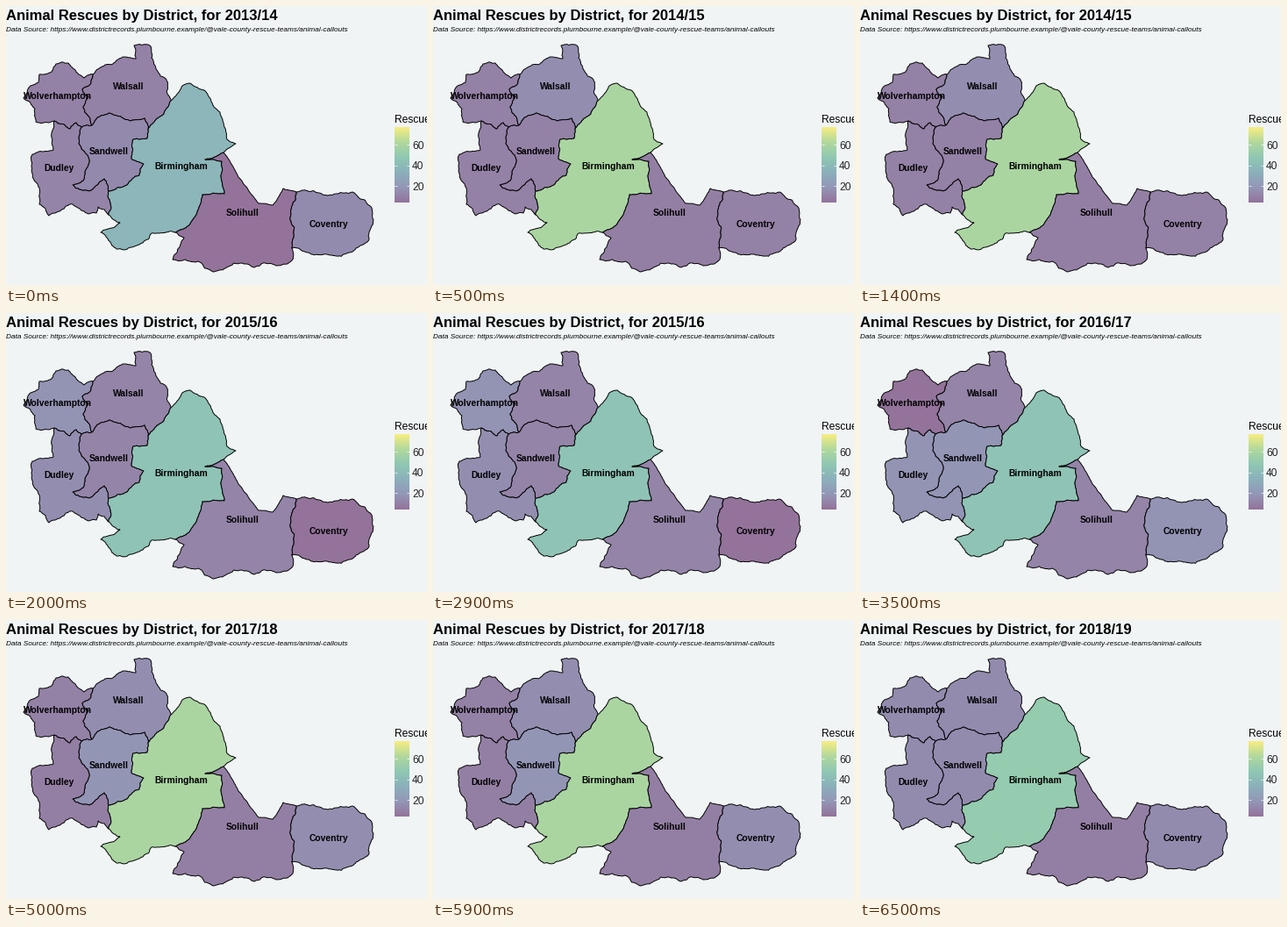
A matplotlib script that plays this animation: 480x318 px, repeating every 8 s.

```python
import math
import random

import matplotlib.pyplot as plt
import numpy as np
from matplotlib.animation import FuncAnimation
from matplotlib.colors import LinearSegmentedColormap, Normalize
from matplotlib.patches import Polygon

W, H, DPI = 480, 318, 100
BG = "#f0f4f5"
CMAP = LinearSegmentedColormap.from_list(
    "rescues", ["#94739b", "#9397b7", "#8bb0bb", "#8fc8b3", "#b0d89d", "#f7ed82"])
NORM = Normalize(4, 77.5)

rng = random.Random(7)


def crinkle(a, b, rough):
    """Points from a up to b, made jagged by midpoint displacement."""
    dx, dy = b[0] - a[0], b[1] - a[1]
    if math.hypot(dx, dy) < 2.5:
        return [a]
    k = rng.uniform(-rough, rough)
    mid = ((a[0] + b[0]) / 2 - dy * k, (a[1] + b[1]) / 2 + dx * k)
    return crinkle(a, mid, rough) + crinkle(mid, b, rough)


def edge(*pts, rough=0.13):
    line = []
    for a, b in zip(pts, pts[1:]):
        line += crinkle(a, b, rough)
    return line + [pts[-1]]


def ring(first, *edges):
    """Chain edges into one outline, flipping those that run backwards."""
    pts = list(first)
    for e in edges:
        pts += e if e[0] == pts[-1] else e[::-1]
    return pts


# Outer edges
wolv_out = edge((55, 131), (34, 132), (33, 117), (20, 105), (28, 91), (37, 87), (38, 78),
                (52, 75), (57, 66), (71, 65), (89, 82), (99, 78))
wals_out = edge((99, 78), (113, 67), (134, 58), (148, 60), (146, 45), (164, 45),
                (166, 59), (183, 84), (188, 108))
bham_n = edge((188, 108), (201, 91), (210, 88), (226, 96), (238, 116), (244, 121),
              (249, 138), (252, 152), (262, 157), (248, 167), rough=0.08)
sol_n = edge((248, 167), (265, 195), (288, 225), (304, 227), (316, 208), (331, 212),
             rough=0.06)
cov_out = edge((331, 212), (357, 213), (377, 214), (395, 212), (418, 236), (414, 266),
               (395, 280), (369, 284), (345, 281), (326, 276))
sol_s = edge((326, 276), (326, 290), (308, 296), (293, 293), (283, 298), (260, 293),
             (250, 299), (237, 303), (219, 291), (190, 289), (203, 264), (193, 258))
bham_s = edge((193, 258), (166, 259), (156, 270), (126, 277), (108, 258), (130, 247),
              (117, 238))
dud_out = edge((117, 238), (105, 229), (103, 236), (94, 237), (76, 226), (49, 239),
               (38, 226), (36, 203), (29, 182), (30, 169), (54, 164), (52, 150), (55, 131))

# Shared borders
wolv_wals = edge((99, 78), (97, 87), (87, 95), (94, 103), (88, 115), (98, 136))
wolv_sand = edge((98, 136), (86, 138))
wolv_dud = edge((86, 138), (80, 133), (73, 140), (55, 131))
wals_bham = edge((188, 108), (180, 123), (162, 141))
wals_sand = edge((162, 141), (158, 128), (142, 131), (118, 122), (98, 136))
dud_sand = edge((86, 138), (86, 163), (95, 176), (88, 199), (76, 204), (95, 211),
                (112, 197), (117, 211))
sand_bham = edge((117, 211), (138, 204), (152, 193), (157, 180), (143, 174), (145, 152),
                 (161, 151), (162, 141))
dud_bham = edge((117, 211), (117, 238))
bham_sol = edge((248, 167), (227, 175), (246, 177), (249, 214), (224, 215), (218, 235),
                (205, 253), (193, 258), rough=0.08)
sol_cov = edge((331, 212), (326, 228), (324, 241), (328, 264), (326, 276))

# name: (outline, label x, label baseline, rescues per year)
DISTRICTS = {
    "Wolverhampton": (ring(wolv_out, wolv_wals, wolv_sand, wolv_dud),
                      59, 106, (10, 10, 17, 4, 10, 14)),
    "Walsall": (ring(wals_out, wals_bham, wals_sand, wolv_wals),
                140, 95, (10, 15, 11, 11, 15, 14)),
    "Sandwell": (ring(wals_sand, wolv_sand, dud_sand, sand_bham),
                 117, 169, (13, 10, 11, 18, 18, 14)),
    "Dudley": (ring(dud_out, wolv_dud, dud_sand, dud_bham),
               60.5, 188, (11, 10, 15, 17, 9, 14)),
    "Birmingham": (ring(bham_n, bham_sol, bham_s, dud_bham, sand_bham, wals_bham),
                   199.5, 186, (37, 60, 45, 45, 60, 51)),
    "Solihull": (ring(sol_n, sol_cov, sol_s, bham_sol),
                 269.5, 239, (4, 9, 11, 11, 9, 9)),
    "Coventry": (ring(cov_out, sol_cov),
                 368.5, 252, (14, 10, 4, 17, 15, 14)),
}

fig = plt.figure(figsize=(W / DPI, H / DPI), dpi=DPI, facecolor=BG)
ax = fig.add_axes([0, 0, 1, 1])


def text(x, y, s, px, **style):
    return ax.text(x, y, s, fontsize=px * 72 / DPI, family="Liberation Sans",
                   va="baseline", **style)


title = text(0, 16, "", 16.6, weight="bold")
text(0, 29, "Data Source: https://www.districtrecords.plumbourne.example/"
     "@vale-county-rescue-teams/animal-callouts", 8.24, style="italic")

areas = {}
for name, (outline, x, y, _) in DISTRICTS.items():
    areas[name] = ax.add_patch(Polygon(outline, ec="black", lw=0.7, joinstyle="round"))
    text(x, y, name, 10.2, weight="bold", ha="center")

# Legend
LEFT, RIGHT, TOP, BOTTOM, TICK = 443, 460, 138, 224, 3.4
ramp = np.linspace(NORM.vmax, NORM.vmin, 256)[:, None]
ax.imshow(ramp, cmap=CMAP, norm=NORM, extent=(LEFT, RIGHT, BOTTOM, TOP), aspect="auto")
text(LEFT, 133, "Rescues", 12, clip_on=True)
for count in (20, 40, 60):
    y = BOTTOM - NORM(count) * (BOTTOM - TOP)
    for x in (LEFT, RIGHT - TICK):
        ax.plot([x, x + TICK], [y, y], color="white", lw=0.5, solid_capstyle="butt")
    text(463, y + 4.5, str(count), 12, color="#222222")

ax.set(xlim=(0, W), ylim=(H, 0))
ax.axis("off")


def update(step):
    year = (step + 2) // 3
    title.set_text(f"Animal Rescues by District, for {2013 + year}/{14 + year}")
    for name, area in areas.items():
        area.set_facecolor(CMAP(NORM(DISTRICTS[name][3][year])))
    return [title, *areas.values()]


anim = FuncAnimation(fig, update, frames=16, interval=500, repeat=True, repeat_delay=0)
plt.show()
```
